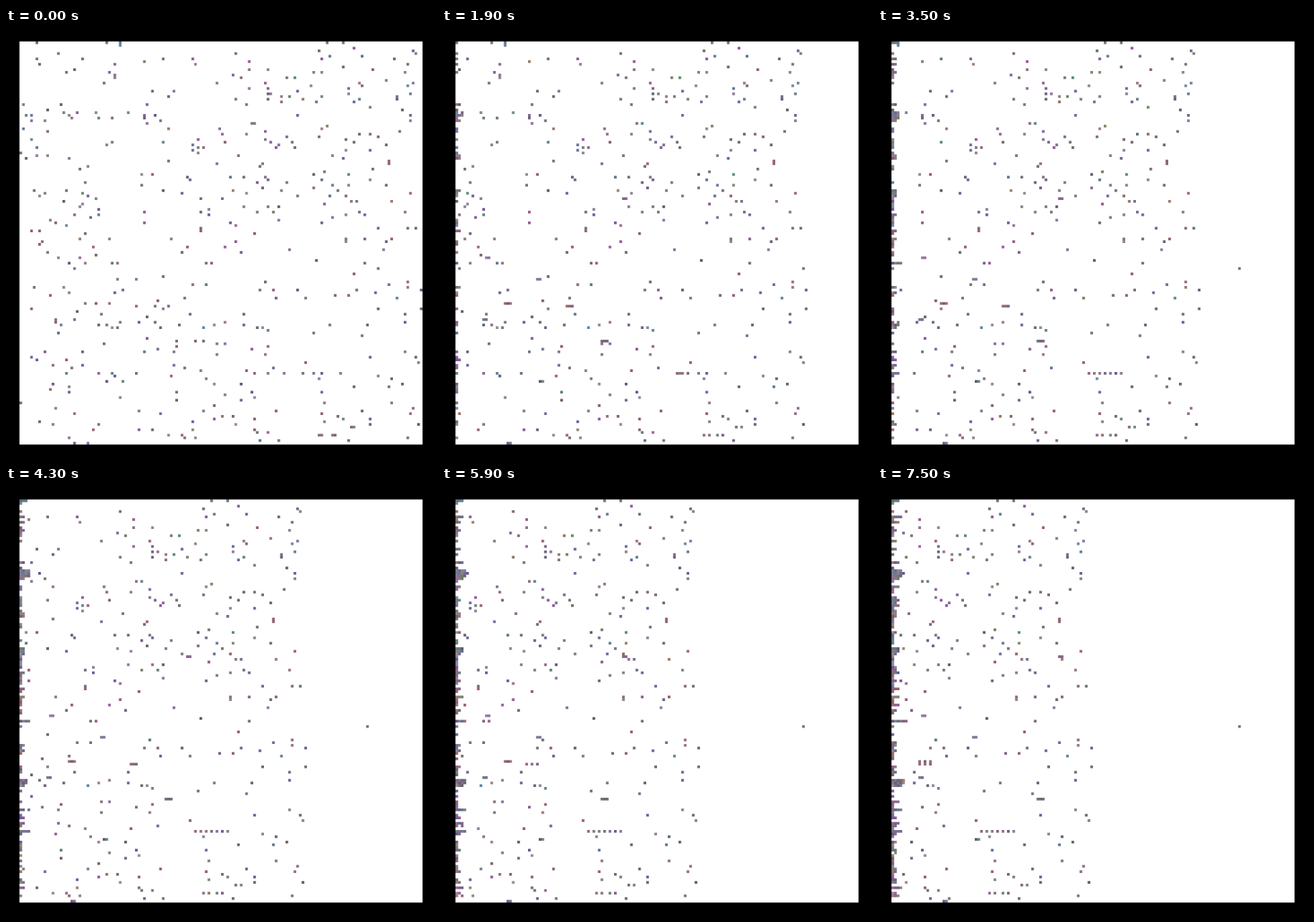
A matplotlib script for the animation above (7600 ms loop, 600 by 600 pixels).

```python
import numpy as np
import matplotlib.pyplot as plt
from matplotlib.animation import FuncAnimation

SIZE, CELLS, EDGE = 600, 160, 5
FRAMES, INTERVAL = 76, 100
DENSITY = 0.021

# Invisible obstacles: (row, column, step at which it opens, queue length)
OBSTACLES = [
    (63, 66, FRAMES, 2),
    (85, 15, FRAMES, 2),
    (89, 133, FRAMES, 1),
    (93, 34, FRAMES, 2),
    (102, 22, 68, 3),
    (103, 45, 45, 3),
    (108, 14, FRAMES, 2),
    (116, 58, FRAMES, 3),
    (128, 86, 27, 7),
    (131, 35, FRAMES, 2),
    (154, 23, FRAMES, 2),
]


def scatter(rng):
    """Random particles, with a loose queue behind each obstacle."""
    grid = np.zeros((CELLS, CELLS), bool)
    inside = grid[EDGE:-EDGE, EDGE:-EDGE]
    inside[:] = rng.random(inside.shape) < DENSITY
    for row, col, _, count in OBSTACLES:
        grid[row, col:] = False
        grid[row, col + rng.integers(2, 9, count).cumsum()] = True
    return np.nonzero(grid)


def simulate(rows, cols):
    """Each particle steps left whenever the cell beside it is free."""
    states = [cols]
    for step in range(1, FRAMES):
        taken = np.zeros((CELLS, CELLS), bool)
        taken[:, :EDGE] = True
        taken[rows, cols] = True
        for row, col, opens, _ in OBSTACLES:
            if step < opens:
                taken[row, col] = True
        cols = cols - ~taken[rows, cols - 1]
        states.append(cols)
    return states


def coverage():
    """Share of every cell in every pixel along one axis."""
    px = np.arange(SIZE)[:, None]
    scale = SIZE / CELLS
    left = np.arange(CELLS)[None, :] * scale
    return np.clip(np.minimum(px + 1, left + scale) - np.maximum(px, left), 0, 1)


rng = np.random.default_rng(7)
rows, start = scatter(rng)
colors = rng.uniform((92, 85, 100), (160, 140, 165), (len(rows), 3))
states = simulate(rows, start)
weights = coverage()


def render(i):
    cells = np.zeros((3, CELLS, CELLS))
    cells[:, EDGE:-EDGE, EDGE:-EDGE] = 255
    cells[:, rows, states[i]] = colors.T
    pixels = weights @ cells @ weights.T
    return np.clip(pixels.round(), 0, 255).astype(np.uint8).transpose(1, 2, 0)


fig = plt.figure(figsize=(6, 6), dpi=100, facecolor="black")
ax = fig.add_axes([0, 0, 1, 1])
ax.axis("off")
image = ax.imshow(render(0), interpolation="nearest", aspect="auto")


def update(i):
    image.set_data(render(i))
    return [image]


anim = FuncAnimation(fig, update, frames=FRAMES, interval=INTERVAL,
                     repeat=True, repeat_delay=0, blit=False)
plt.show()
```
